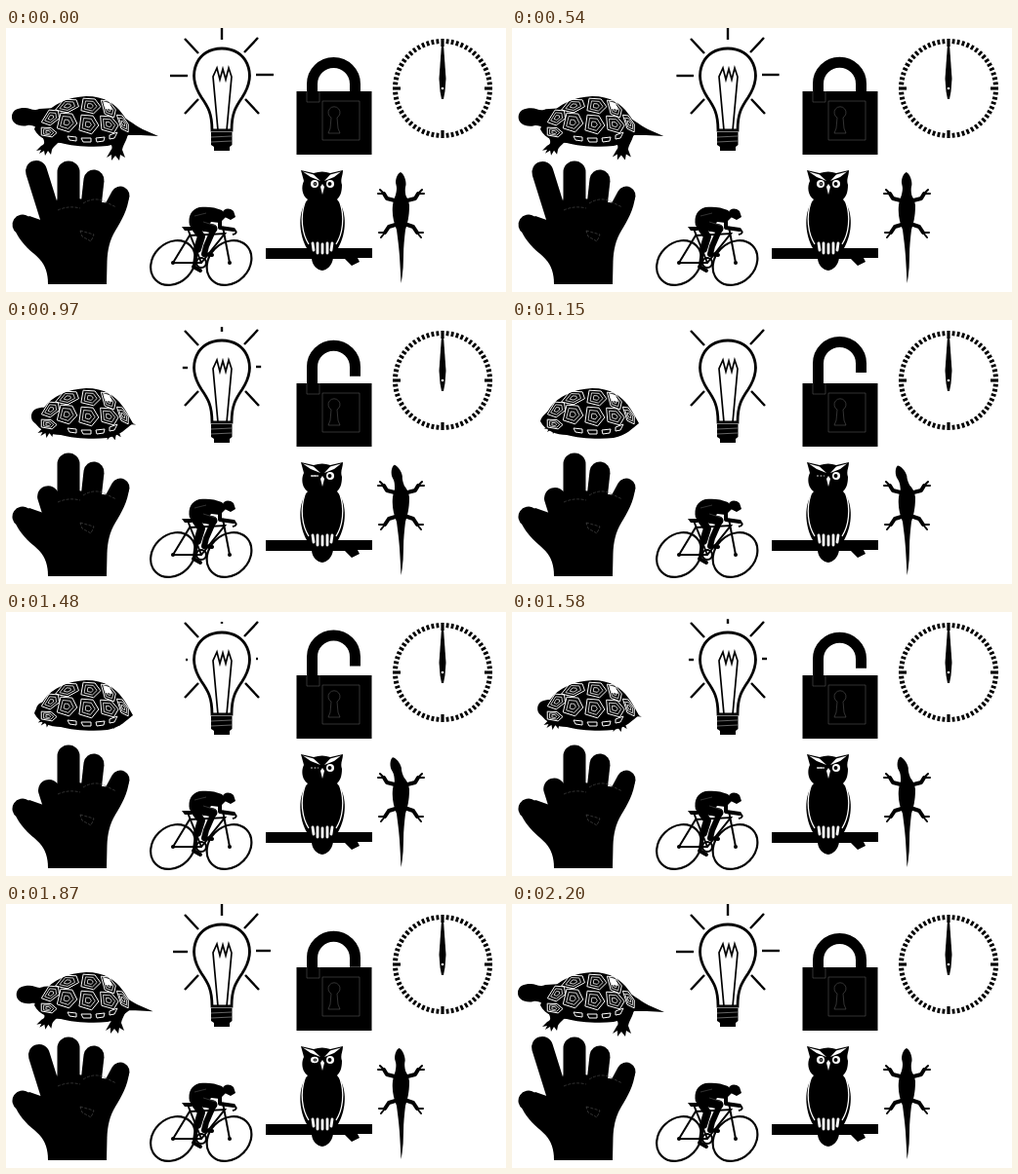
Recreate the animation shown at these times as an HTML page. Size 512 by 271 pixels, loop 2300 ms.

```html
<!DOCTYPE html>
<html lang="en">
<head>
<meta charset="utf-8">
<title>Eight silhouettes</title>
<style>
  /* --p runs from 0 (open) to 1 (drawn in) and drives every moving part */
  @property --p { syntax: "<number>"; inherits: true; initial-value: 0; }
  @keyframes fold {
    0%, 22.9% { --p: 0; }
    50%, 61.3% { --p: 1; }
    64.35% { --p: .89; }
    75.2% { --p: .47; }
    84.8%, 100% { --p: 0; }
  }
  html, body { margin: 0; width: 100%; height: 100%; overflow: hidden; background: #fff; }
  svg { display: block; width: 100%; height: 100%; animation: fold 2300ms linear infinite; }
  .line { fill: none; stroke: #000; }
  .round { stroke-linecap: round; stroke-linejoin: round; }
  .white { fill: #fff; }
  .cut { fill: none; stroke: #fff; }
  .faint { fill: none; stroke: #555; stroke-width: .6; }
  .ray { stroke: #000; stroke-width: 2.4; }
  .shrink { stroke-dasharray: calc((1 - var(--p)) * 1px) 2px; }
  .head { transform: translate(calc(var(--p) * 28px), calc(var(--p) * 11px)); }
  .tail { transform: translate(calc(var(--p) * -32px), calc(var(--p) * -5px)); }
  .foreleg { transform: translate(calc(var(--p) * 2px), calc(var(--p) * -14px)); }
  .hindleg { transform: translate(calc(var(--p) * -6px), calc(var(--p) * -18px)); }
  .finger { transform: translate(min(var(--p) * 17px, 13px), min(var(--p) * 48px, 36px)); }
  .shackle { transform: translateY(calc(var(--p) * -13px)); }
  .wink { transform-origin: 316px 160px; transform: scaleY(max(0, 1 - var(--p) * 1.15)); }
  .turn { transform-origin: 404px 176px; transform: rotate(calc(var(--p) * -19deg)); }
</style>
</head>
<body>
<svg viewBox="0 0 512 271" preserveAspectRatio="none">
  <g id="turtle">
    <path class="head" d="M6 90C7 84 12 82 19 82C25 82 28 86 34 83L50 82L52 106L38 108C33 104 29 99 22 100C14 102 5 98 6 90Z"/>
    <path class="tail" d="M112 88C124 92 130 99 140 104L156 111L138 110L114 110Z"/>
    <path class="foreleg" d="M40 104L58 112C53 119 49 121 47 125L46 130L43 126L40 131L39 126L34 129L36 125L31 126L36 121C42 119 38 114 36 108Z"/>
    <path class="hindleg" d="M102 104L124 104C127 112 120 118 119 125L122 133L117 130L116 136L112 131L108 136L108 130L103 133L107 126C112 121 104 116 100 113Z"/>
    <path d="M29 104C30 98 36 96 39 90C47 78 64 71 82 70C101 70 112 78 119 88C125 96 127 101 130 106C122 112 118 118 104 121C88 123 67 121 56 118C46 118 34 114 29 104Z"/>
    <g id="shell" class="cut" stroke-linejoin="round"></g>
    <path class="white" d="M99 75L106 77L109 84L102 83Z"/>
    <path class="cut" stroke-width="1" d="M63 111L72 112L72 116L65 115ZM77 113H87V117H79ZM92 113L101 112L100 116L93 117ZM106 110L114 107L111 113L106 114Z"/>
  </g>

  <g id="bulb">
    <path class="line" stroke-width="2.8" d="M211 105C211 88 207 81 200 71C184 46 196 21 221 21C246 21 258 46 242 71C235 81 231 88 231 105Z"/>
    <path class="line" stroke-width="1.7" d="M217 105L212 50L216 41L219 53L222 42L225 53L228 41L231 50L226 105"/>
    <path d="M210 107H231.500V120L229 122V126H213V122L210 120Z"/>
    <path class="cut" stroke-width=".4" d="M210 112L231 111M210 117L231 116"/>
    <g class="ray">
      <path class="shrink" pathLength="1" d="M221 12V-5"/>
      <path class="shrink" pathLength="1" d="M186 49H168"/>
      <path class="shrink" pathLength="1" d="M256 48H274"/>
      <path d="M183 11L197 26M258 10L244 25M197 73L183 88M245 73L259 88"/>
    </g>
  </g>

  <g id="lock">
    <path class="line shackle" stroke-width="11" d="M313.500 80V57.500A22 22 0 0 1 357.500 57.500V67"/>
    <rect x="297.500" y="65" width="77" height="65"/>
    <path class="faint" d="M308 65V76H321V65M324 75H362V115H324ZM333 92A6 6 0 1 1 339 92L340 103L342 108H330L332 103Z"/>
  </g>

  <g id="clock">
    <g id="ticks" stroke="#000"></g>
    <path d="M446 17H448L450.500 52L449.500 65L448 73H446L444.500 65L443.500 52Z"/>
    <circle class="white" cx="447" cy="62" r="1.3"/>
  </g>

  <g id="hand">
    <path d="M43 263C43 247 38 240 29 232C19 224 11 214 8 204L24 193L44 200L54 172L106 180L126 173C125 186 118 198 112 208C106 218 104 228 103.500 240L103 263Z"/>
    <g class="line round">
      <path stroke-width="21" d="M42 218L17 202"/>
      <path stroke-width="23" d="M64 196V148"/>
      <path stroke-width="21" d="M86 192L90 156"/>
      <path stroke-width="19" d="M103 198L117 172"/>
      <path class="finger" stroke-width="22" d="M46 195L31 147"/>
    </g>
    <path class="faint" stroke-dasharray="3 1.5" d="M53 187Q64 182 76 185M79 180Q90 173 101 178M101 178L113 184M76 208L90 212L87 219L78 214Z"/>
  </g>

  <g id="cyclist">
    <g class="line" stroke-width="2.2">
      <ellipse rx="25" ry="20.5" transform="translate(171 241) rotate(-45)"/>
      <ellipse rx="25" ry="20.5" transform="translate(228.500 241) rotate(-45)"/>
      <path stroke-width="2" d="M171 241L188 213L224 211L200 241ZM186 206L200 241M222 204L229 241M222 205L234 207Q238 211 232 212"/>
      <circle cx="200" cy="241" r="5"/>
    </g>
    <path d="M180 204H194L190 208H183Z"/>
    <circle cx="171" cy="241" r="2"/><circle cx="229" cy="241" r="2"/>
    <path d="M188 203C186 193 190 186 198 184C207 183 214 184 221 187L226 193L219 200L210 199L203 209Z"/>
    <path d="M222 189C223 185 229 184 233 188L235 194L230 197L224 194Z"/>
    <g class="line round">
      <path stroke-width="9" d="M194 202L212 206"/>
      <path stroke-width="6" d="M212 208L205 224L203 232"/>
      <path stroke-width="8" d="M193 204L200 214L196 227"/>
      <path stroke-width="4" d="M195 229L193 243M192 245L199 249M203 232L211 233M219 193L219 205L233 207"/>
    </g>
    <path class="faint" d="M193 193L205 190M202 199L215 203"/>
  </g>

  <g id="owl">
    <path d="M266 226H375V236H360L362 240L354 244L347 237H266Z"/>
    <path d="M302 146L315 149Q324 146 332 149L345 146C345 152 342 155 344 161C344 169 342 173 339 176C349 187 349 207 342 222L335 236C334 244 329 248 324 249C318 248 314 244 313 237L308 226C300 212 298 188 309 176C303 172 302 163 305 157Z"/>
    <path class="white" d="M304 147.500L315 150.500L322 157L312 153ZM343 147.500L332 150.500L326 157L336 153ZM322 163L324 160L326 163L324 171Z"/>
    <g class="wink"><circle class="white" cx="316" cy="160" r="4"/><circle cx="316.500" cy="160" r="2"/></g>
    <path class="cut" stroke-width=".8" stroke-dasharray="2 1.5" d="M312 160H320"/>
    <circle class="white" cx="332" cy="160" r="4"/><circle cx="331.500" cy="160" r="2"/>
    <path class="cut" stroke-width="1.3" d="M306 179C301 194 303 211 310 222M342 179C347 194 345 211 338 222"/>
    <path class="cut round" stroke-width="2.8" d="M314 221L315 228M319 221V231M324 222V231M329 221V231M334 221L333 228"/>
  </g>

  <g id="lizard">
    <path d="M404 168C409 170 412 175 413 182C413 194 411 201 409 207C408 216 407 224 407 234Q407 250 404.500 262Q404 250 403 234C402 222 401 215 400 207C397 200 395 191 396 182C397 175 399 170 404 168Z"/>
    <path class="turn" d="M404 148C407 149 410 156 409.500 161C408 166 409 171 411 179H397C399 171 401 166 399.500 161C398 156 401 149 404 148Z"/>
    <g class="line round" stroke-width="4">
      <path d="M402 178L390 175L387 170M407 178L419 175L422 170M402 201L392 204L388 210M408 201L417 204L421 210"/>
      <path stroke-width="2" d="M387 170L381 170M387 170L383 166M422 170L428 170M422 170L426 166M388 210L382 210M388 210L384 215M421 210L427 210M421 210L425 215"/>
    </g>
  </g>
</svg>
<script>
  const add = (parent, name, attrs) => {
    const node = document.createElementNS("http://www.w3.org/2000/svg", name);
    for (const key in attrs) node.setAttribute(key, attrs[key]);
    document.getElementById(parent).append(node);
  };

  for (let i = 0; i < 60; i++) {
    const quarter = i % 15 === 0;
    add("ticks", "line", {
      x1: 447, x2: 447, y1: 11, y2: quarter ? 19 : 16,
      "stroke-width": quarter ? 3.2 : 2.8, transform: `rotate(${i * 6} 447 62)`
    });
  }

  // Each plate: centre x, centre y, half width, half height, lean
  const plates = [
    [63, 80, 12, 7, -3], [86, 80, 11, 8, 1], [105, 83, 7, 9, 4],
    [46, 92, 9, 8, -3], [62, 97, 11, 10, 0], [84, 99, 11, 10, 1],
    [105, 99, 10, 9, 3], [43, 107, 9, 5, 2], [120, 98, 5, 9, 4]
  ];
  for (const [x, y, w, h, lean] of plates) {
    for (const scale of [.98, .64, .3]) {
      const corners = [[-.55, -1], [.55, -.9], [1, .1], [.25, 1], [-.9, .6]]
        .map(([u, v]) => [x + (u * w + v * lean) * scale, y + v * h * scale]);
      add("shell", "polygon", { points: corners.join(" "), "stroke-width": scale > .9 ? 1 : .8 });
    }
  }
</script>
</body>
</html>
```
